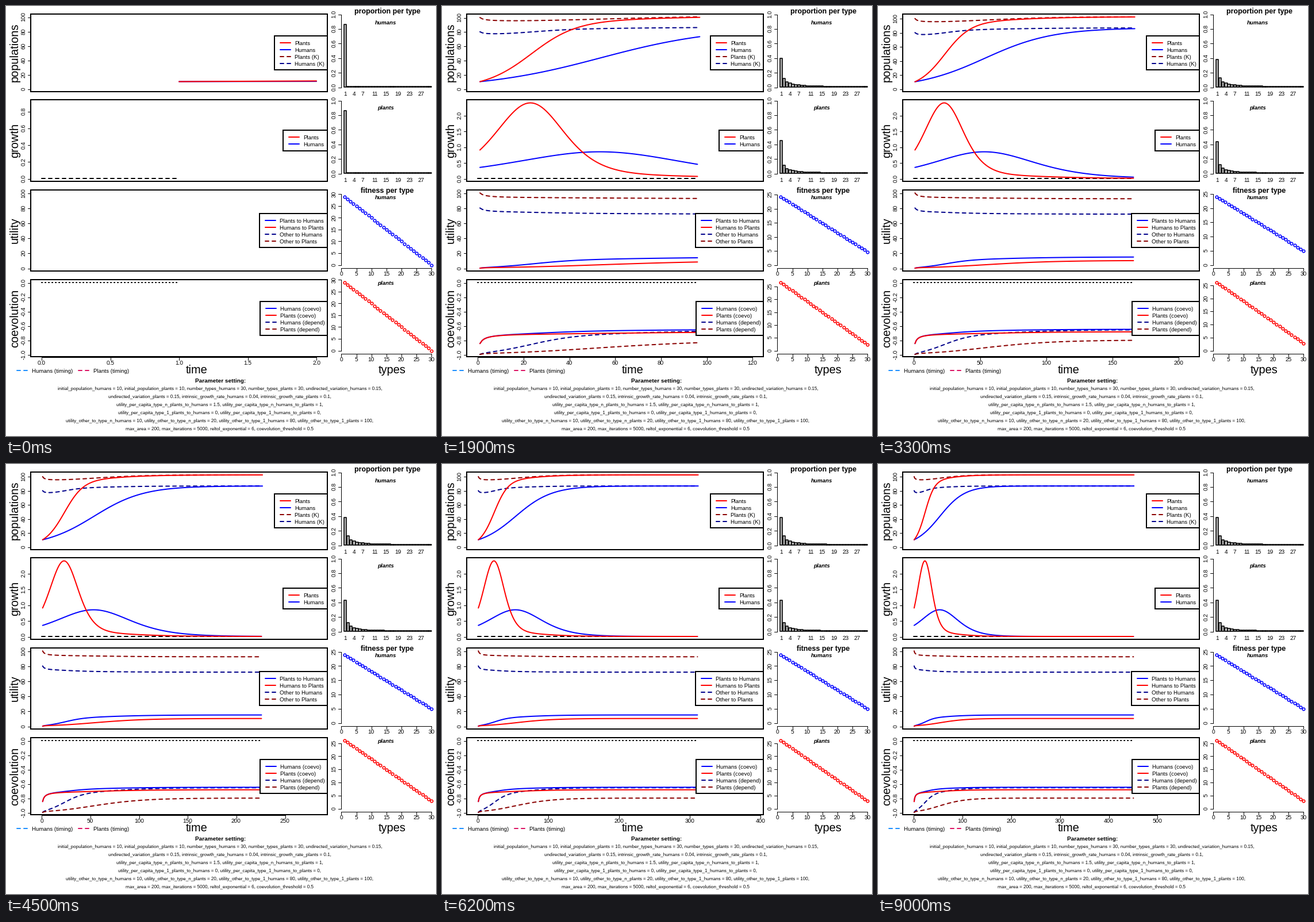
Write a matplotlib script that moves like this. It is 748 px wide and 748 px high and loops after 9.1 s.

```python
import numpy as np
import matplotlib.pyplot as plt
from matplotlib.animation import FuncAnimation
from matplotlib.collections import PolyCollection

plt.rcParams.update({"font.family": "Liberation Sans", "text.hinting": "native",
                     "path.simplify": False})

SIZE, DPI = 748, 64
PX = 72 / DPI                      # points per pixel
FRAMES, STEP = 91, 5
TYPES = 30
RED, BLUE, DARK_RED, DARK_BLUE = "#ff0000", "#0000ff", "#8b0000", "#00008b"
DASH, DOT = (0, (3, 3)), (0, (0.6, 2.4))
LEFT, RIGHT, X0, SPAN = 43, 559, 62, 478


# ---------- model ----------
def simulate(steps):
    k = np.arange(TYPES)
    w = k / (TYPES - 1)
    h = np.eye(TYPES)[0]
    p = h.copy()
    H = P = 10.0
    names = "H P KH KP gH gP uPH uHP oH oP cH cP dH dP hv pv fH fP".split()
    log = {n: [] for n in names}
    for _ in range(steps):
        uPH, uHP = 1.5 * P * (w @ p), H * (w @ h)
        oH, oP = 80 - 70 * (w @ h), 100 - 80 * (w @ p)
        KH, KP = uPH + oH, min(uHP + oP, 200)
        gH, gP = 0.04 * H * (1 - H / KH), 0.1 * P * (1 - P / KP)
        hv, pv = 0.85 * h + 0.15 / TYPES, 0.85 * p + 0.15 / TYPES
        fH = ((TYPES - 1 - k) * oH + k * uPH) / KH
        fP = ((TYPES - 1 - k) * oP + k * uHP) / KP
        row = (H, P, KH, KP, gH, gP, uPH, uHP, oH, oP,
               2 * (w @ hv) - 1, 2 * (w @ pv) - 1,
               (uPH - oH) / KH, (uHP - oP) / KP, hv, pv, fH, fP)
        for n, v in zip(names, row):
            log[n].append(v)
        h, p = hv * fH, pv * fP
        h, p = h / h.sum(), p / p.sum()
        H, P = H + gH, P + gP
    return {n: np.array(v) for n, v in log.items()}


def pretty(top):
    """Round tick values for an axis from 0 to top with 4% margins."""
    cell = top * 1.08 / 5
    base = 10 ** np.floor(np.log10(cell))
    unit = base
    for mult, bias in ((2, 0.8), (5, 1.7), (10, 0.8)):
        if mult * base - cell < bias * (cell - unit):
            unit = mult * base
        else:
            break
    return np.arange(int(top * 1.045 / unit) + 1) * unit


# ---------- drawing helpers ----------
fig = plt.figure(figsize=(SIZE / DPI, SIZE / DPI), dpi=DPI, facecolor="white")
ax = fig.add_axes([0, 0, 1, 1])
ax.set_xlim(0, SIZE)
ax.set_ylim(SIZE, 0)
ax.axis("off")


def text(x, y, s, size=10, ha="center", rot=0, **kw):
    """Text whose capitals are centred on (x, y) across the baseline."""
    drop = 0.36 * size
    dx, dy = (drop, 0) if rot else (0, drop)
    return ax.text(x + dx, y + dy, s, fontsize=size * PX, ha=ha, va="baseline",
                   rotation=rot, rotation_mode="anchor", zorder=6, **kw)


def line(xs, ys, color="black", width=2, style="-", z=2):
    return ax.plot(xs, ys, color=color, lw=width * PX, ls=style, zorder=z,
                   solid_capstyle="round", dash_capstyle="round")[0]


def segment(xs, ys):
    return line(np.add(xs, 0.5), np.add(ys, 0.5), width=1, z=3)


def rect(x0, y0, x1, y1, fill, z):
    ax.add_patch(plt.Rectangle((x0, y0), x1 - x0, y1 - y0, fc=fill, ec="black",
                               lw=2 * PX, zorder=z))


def labels(vals):
    digits = 1 if abs(vals[1] - vals[0]) < 0.99 else 0
    return [f"{round(v, 1) + 0:.{digits}f}" for v in vals]


def vaxis(x, vals, pos):
    ys = [pos(v) for v in vals]
    out = [segment([x, x], [ys[0], ys[-1]])]
    for y, s in zip(ys, labels(vals)):
        out += [segment([x - 5, x], [y, y]), text(x - 13, y, s, rot=90)]
    return out


def haxis(y, vals, pos):
    xs = [pos(v) for v in vals]
    out = [segment([xs[0], xs[-1]], [y, y])]
    for x, s in zip(xs, labels(vals)):
        out += [segment([x, x], [y, y + 5]), text(x, y + 10.4, s)]
    return out


def scale(zero, per_unit):
    return lambda v: zero - per_unit * np.asarray(v)


def legend(x, top, bottom, first, rows):
    rect(x, top, RIGHT, bottom, "white", 4)
    for i, (name, color, style) in enumerate(rows):
        y = first + 12 * i
        line([x + 10, x + 28], [y, y], color, style=style, z=5)
        text(x + 35, y + 0.7, name, 9.8, ha="left")


# ---------- left panels ----------
y_util, y_coevo = scale(456, 1.308), scale(481, 125)

for name, top, bottom, mid in (("populations", 14, 149, 81), ("growth", 163, 305, 234),
                               ("utility", 320, 461, 390), ("coevolution", 476, 610, 543)):
    rect(LEFT, top, RIGHT, bottom, "none", 3)
    text(13.6, mid, name, 20, rot=90)

vaxis(LEFT, np.arange(0, 101, 20), y_util)
vaxis(LEFT, np.arange(-5, 1) / 5, y_coevo)

legend(467, 52, 111, 64, [("Plants", RED, "-"), ("Humans", BLUE, "-"),
                          ("Plants (K)", DARK_RED, DASH), ("Humans (K)", DARK_BLUE, DASH)])
legend(482, 216, 252, 228, [("Plants", RED, "-"), ("Humans", BLUE, "-")])
legend(441, 361, 420, 373, [("Plants to Humans", BLUE, "-"), ("Humans to Plants", RED, "-"),
                            ("Other to Humans", DARK_BLUE, DASH),
                            ("Other to Plants", DARK_RED, DASH)])
legend(442, 514, 573, 526, [("Humans (coevo)", BLUE, "-"), ("Plants (coevo)", RED, "-"),
                            ("Humans (depend)", DARK_BLUE, DASH),
                            ("Plants (depend)", DARK_RED, DASH)])

# ---------- right panels ----------
AXIS_X = 583
bar_x = 588.1 + 5.08 * np.arange(TYPES)
type_x = AXIS_X + 0.5 + 5.23 * np.arange(1, TYPES + 1)


def bar_panel(zero):
    pos = scale(zero, 127)
    vaxis(AXIS_X, np.arange(6) / 5, pos)
    for n in (1, 4, 7, 11, 15, 19, 23, 27):
        text(bar_x[n - 1] + 2.1, zero + 11, str(n))
    bars = PolyCollection([], facecolors="#bebebe", edgecolors="black", zorder=2,
                          linewidths=1.6 * PX)
    ax.add_collection(bars, autolim=False)
    return bars, pos


def dot_panel(zero, color):
    haxis(zero + 5, np.arange(0, 31, 5), lambda v: AXIS_X + 5.23 * v)
    return ax.plot([], [], "o", mfc="none", mec=color, ms=4.6 * PX, mew=1.6 * PX,
                   zorder=3)[0]


bar_panels = [(*bar_panel(141), "hv"), (*bar_panel(291), "pv")]
dot_panels = [(dot_panel(450, BLUE), 450, "fH"), (dot_panel(599, RED), 599, "fP")]

text(663.5, 8.7, "proportion per type", 12.5, weight="bold")
text(663.5, 320.7, "fitness per type", 12.5, weight="bold")
for y, s in ((28, "humans"), (176, "plants"), (332, "humans"), (481, "plants")):
    text(661, y + 0.5, s, 9.7, weight="bold", style="italic")

# ---------- captions ----------
text(332, 631.5, "time", 20)
text(671.5, 631.5, "types", 20)
for x, s, c in ((19, "Humans (timing)", "#1e90ff"), (126, "Plants (timing)", "#dc1464")):
    line([x, x + 19], [634, 634], c, style=DASH)
    text(x + 26.5, 634.7, s, 9.8, ha="left")

text(373, 651.5, "Parameter setting:", weight="bold")
for i, s in enumerate((
        "initial_population_humans = 10, initial_population_plants = 10, "
        "number_types_humans = 30, number_types_plants = 30, undirected_variation_humans = 0.15,",
        "undirected_variation_plants = 0.15, intrinsic_growth_rate_humans = 0.04, "
        "intrinsic_growth_rate_plants = 0.1,",
        "utility_per_capita_type_n_plants_to_humans = 1.5, "
        "utility_per_capita_type_n_humans_to_plants = 1,",
        "utility_per_capita_type_1_plants_to_humans = 0, "
        "utility_per_capita_type_1_humans_to_plants = 0,",
        "utility_other_to_type_n_humans = 10, utility_other_to_type_n_plants = 20, "
        "utility_other_to_type_1_humans = 80, utility_other_to_type_1_plants = 100,",
        "max_area = 200, max_iterations = 5000, reltol_exponential = 6, "
        "coevolution_threshold = 0.5")):
    text(372, 665 + 14.05 * i, s, 8)

# ---------- moving parts ----------
data = simulate(STEP * FRAMES + 2)
zero_growth = line([], [], style=DASH)
zero_coevo = line([], [], style=DOT)

# key, colour, style, panel
curves = [(line([], [], color, style=style), key, panel) for key, color, style, panel in (
    ("KH", DARK_BLUE, DASH, "pop"), ("KP", DARK_RED, DASH, "pop"),
    ("H", BLUE, "-", "pop"), ("P", RED, "-", "pop"),
    ("gH", BLUE, "-", "growth"), ("gP", RED, "-", "growth"),
    ("oH", DARK_BLUE, DASH, "util"), ("oP", DARK_RED, DASH, "util"),
    ("uPH", BLUE, "-", "util"), ("uHP", RED, "-", "util"),
    ("dH", DARK_BLUE, DASH, "coevo"), ("dP", DARK_RED, DASH, "coevo"),
    ("cH", BLUE, "-", "coevo"), ("cP", RED, "-", "coevo"))]
ticks = []


def peak(t, *keys):
    return max(data[k][:t].max() for k in keys)


def update(i):
    for a in ticks:
        a.remove()
    ticks.clear()

    t = STEP * i + 1
    x_max = max(2, 1.25 * t)
    to_x = lambda v: X0 + SPAN * np.asarray(v) / x_max
    pop_max, g_max = peak(t, "KH", "KP", "H", "P"), peak(t, "gH", "gP")
    scales = {"pop": scale(144, 125 / pop_max), "growth": scale(300, 131.5 / g_max),
              "util": y_util, "coevo": y_coevo}

    for ln, key, panel in curves:
        n = t + (key in "HP")      # populations run one step ahead
        ln.set_data(to_x(np.arange(1, n + 1)), scales[panel](data[key][:n]))
    zero_growth.set_data(to_x([0, t]), [300, 300])
    zero_coevo.set_data(to_x([0, t]), [481, 481])
    ticks.extend(haxis(610, pretty(x_max), to_x))
    ticks.extend(vaxis(LEFT, pretty(pop_max), scales["pop"]))
    ticks.extend(vaxis(LEFT, pretty(g_max), scales["growth"]))

    for bars, pos, key in bar_panels:
        base = pos(0)
        bars.set_verts([[(x, base), (x, y), (x + 4.23, y), (x + 4.23, base)]
                        for x, y in zip(bar_x, pos(data[key][t - 1]))])
    for dots, zero, key in dot_panels:
        fit = data[key][t - 1]
        pos = scale(zero, 119 / fit.max())
        dots.set_data(type_x, pos(fit) + 0.5)
        ticks.extend(vaxis(AXIS_X, pretty(fit.max()), pos))
    return []


anim = FuncAnimation(fig, update, frames=FRAMES, interval=100, repeat=True,
                     repeat_delay=0, init_func=lambda: [])
plt.show()
```
